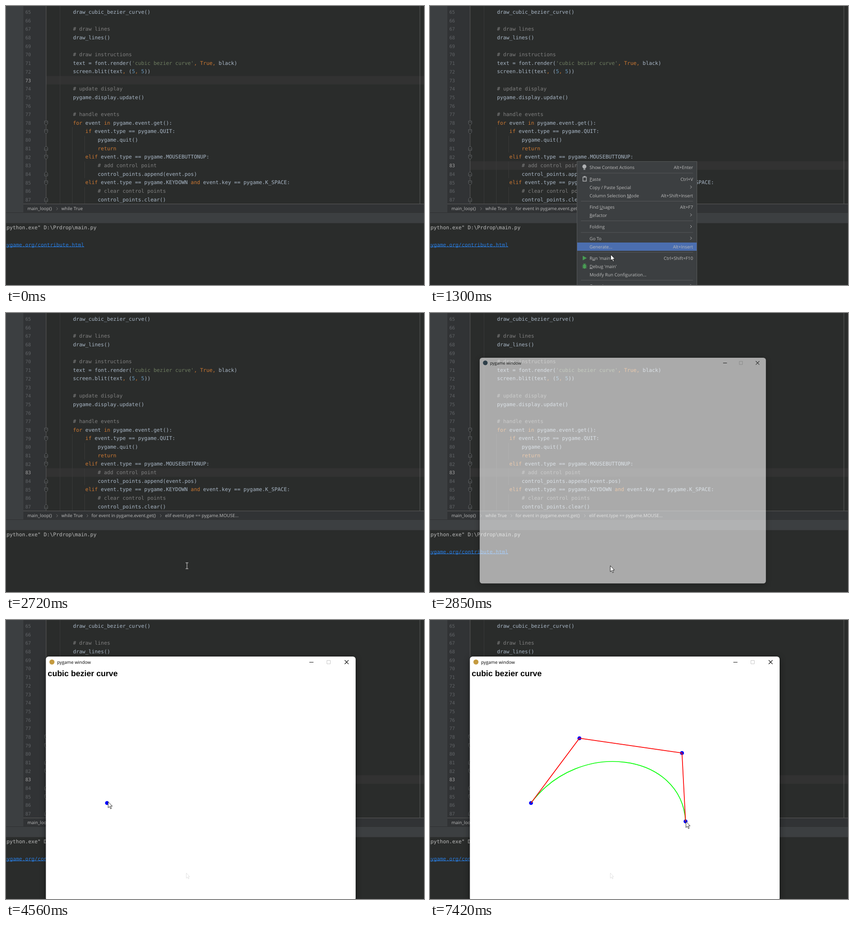
These frames come from a looping animation (917x611 px, 8 s). An HTML page:

```html
<!DOCTYPE html>
<html lang="en">
<head>
<meta charset="utf-8">
<title>Cubic bezier curve</title>
<style>
  html, body { margin: 0; width: 100%; height: 100%; overflow: hidden; background: #2a2c2b; }
  svg { display: block; width: 100vw; height: 100vh; }
  text { white-space: pre; text-rendering: geometricPrecision; }
  .mono { font: 11.3px "DejaVu Sans Mono", "Noto Sans Mono", monospace; fill: #a9b7c6; }
  .num { font-size: 10.3px; fill: #606366; }
  .ui { font: 9.8px "Open Sans", "Noto Sans", sans-serif; fill: #bbb; }
  .head { font: bold 17.6px "Liberation Sans", Arial, sans-serif; }
  .kw { fill: #cc7832; }
  .str { fill: #6e7d60; }
  .val { fill: #6897bb; }
  .note { fill: #808080; }
  .u { text-decoration: underline; }
</style>
</head>
<body>
<svg id="stage" viewBox="0 0 917 611" preserveAspectRatio="none"></svg>
<script>
const LOOP = 8000, ROW = 18.69, CHAR = 6.8;
const rowY = n => 13 + (n - 65) * ROW;

const code = `        draw_cubic_bezier_curve()

        # draw lines
        draw_lines()

        # draw instructions
        text = font.render('cubic bezier curve', True, black)
        screen.blit(text, (5, 5))

        # update display
        pygame.display.update()

        # handle events
        for event in pygame.event.get():
            if event.type == pygame.QUIT:
                pygame.quit()
                return
            elif event.type == pygame.MOUSEBUTTONUP:
                # add control point
                control_points.append(event.pos)
            elif event.type == pygame.KEYDOWN and event.key == pygame.K_SPACE:
                # clear control points
                control_points.clear()`.split('\n');

// label, shortcut ('>' opens a submenu), centre y; & marks the mnemonic
const items = [
  ['Show Context Actions', 'Alt+Enter', 353.5],
  ['&Paste', 'Ctrl+V', 379],
  ['Copy / Paste Special', '>', 397],
  ['Column Selection &Mode', 'Alt+Shift+Insert', 415],
  ['Find &Usages', 'Alt+F7', 440.5],
  ['&Refactor', '>', 458],
  ['Folding', '>', 483.5],
  ['Go To', '>', 509],
  ['Generate...', 'Alt+Insert', 527],
  ["R&un 'main'", 'Ctrl+Shift+F10', 552],
  ["&Debug 'main'", '', 570],
  ['Modify Run Configuration...', '', 588],
  ['Open In', '>', 613]
];
const separators = [366, 427.5, 470.5, 496, 539.5, 600.5];

const rect = (x, y, w, h, fill, more = '') =>
  `<rect x="${x}" y="${y}" width="${w}" height="${h}" fill="${fill}" ${more}/>`;
const path = (d, stroke, more = '') => `<path d="${d}" fill="none" stroke="${stroke}" ${more}/>`;
const text = (x, y, cls, body, more = '') => `<text x="${x}" y="${y}" class="${cls}" ${more}>${body}</text>`;
const group = (id, body, more = '') => `<g id="${id}" ${more}>${body}</g>`;
const chevron = (x, y, color) => path(`M${x - 1.5} ${y - 3}l3 3l-3 3`, color);

function paint(line) {
  const rule = /(#.*)|('.*?')|(\b(?:for|in|if|elif|return|and|True)\b|,)|(\b\d+\b)/g;
  return line.replace(rule, (all, note, str, kw) =>
    `<tspan class="${note ? 'note' : str ? 'str' : kw ? 'kw' : 'val'}">${all}</tspan>`);
}

function codeLine(line, i) {
  const y = rowY(65 + i), body = line.trimStart();
  const x = 92.5 + (line.length - body.length) * CHAR;
  return text(42.4, y + 4, 'mono num', 65 + i, `id="n${65 + i}"`) + text(x, y + 3.6, 'mono', paint(body));
}

function fold(n, dir) {
  const y = rowY(n);
  return `<path d="M84.5 ${y - 4 * dir}h7v${6 * dir}l-3.5 ${3 * dir}l-3.5 ${-3 * dir}z" fill="#2a2c2b" stroke="#606366"/>`
    + path(`M86.3 ${y - dir}h3.4`, '#606366');
}

function editor() {
  const guide = (x, a, b) => path(`M${x} ${a}V${b}`, '#393939');
  const inner = [80, 83, 86].map(n => guide(172.5, rowY(n) - 9, Math.min(433, rowY(n + 1) + 9))).join('');
  return rect(0, 0, 917, 611, '#2a2c2b')
    + rect(38, 0, 50, 433, '#313335')
    + rect(88, 0, 829, 18.6, '#323232', 'id="caret"')
    + guide(118.5, 0, 433) + guide(145.5, 265, 433) + inner
    + path('M88 0V433M908 0V433', '#5a5a5a')
    + code.map(codeLine).join('')
    + [78, 79, 82, 85].map(n => fold(n, 1)).join('')
    + [81, 84, 87].map(n => fold(n, -1)).join('')
    + rect(0, 0, 38, 453, '#3c3f41')
    + rect(38, 433, 879, 20, '#313335')
    + path('M38 433.5H917', '#5a5a5a')
    + path('M0 452.5H917', '#2f3031')
    + rect(0, 453, 917, 22.5, '#3c3f41');
}

function crumbs() {
  const crumb = (x, s) => text(x, 447.3, 'ui', s);
  return crumb(47, 'main_loop()') + chevron(112, 444, '#777') + crumb(121.5, 'while True')
    + group('crumbs', chevron(178.5, 444, '#777') + crumb(187.5, 'for event in pygame.event.get()')
      + chevron(339.5, 444, '#777') + crumb(349, 'elif event.type == pygame.MOUSE...'));
}

function output() {
  return text(-5.6, 489.3, 'mono', '\\python.exe" D:\\Prdrop\\main.py', 'id="command" style="fill:#bbb"')
    + group('link', text(-5.4, 526.6, 'mono', 'pygame.org/contribute.html', 'style="fill:#287bde"')
      + path('M0 527.5H171.5', '#287bde'));
}

function menu() {
  const label = s => s.replace(/&(.)/, '<tspan class="u">$1</tspan>');
  const rows = items.map(([s, key, y]) => text(350, y + 3.5, 'ui', label(s))
    + (key === '>' ? chevron(572.5, y - 0.5, '#bbb') : text(577, y + 3.5, 'ui', key, 'text-anchor="end"')));
  const bulb = '<circle cx="338.7" cy="351.5" r="4.4" fill="#afb1b3"/>' + rect(336.7, 355, 4, 4, '#8d9092');
  const board = path('M335.5 374.5h7.5v9h-7.5z', '#afb1b3', 'stroke-width="1.4"') + rect(337.2, 372.5, 4, 3, '#afb1b3');
  const play = '<path d="M335 547l9 5l-9 5z" fill="#499c54"/>';
  const bug = '<ellipse cx="339" cy="570.5" rx="3.3" ry="4.8" fill="#499c54"/>'
    + path('M334 567.5h10M333.5 570.5h11M334 573.5h10M336.5 564l5 3M341.5 564l-5 3', '#499c54', 'stroke-width="1.2"');
  return group('menu', rect(322.5, 340.5, 263, 290, '#3c3f41', 'stroke="#565859"')
    + rect(323, 0, 262, 18, '#4b6eaf', 'id="hover"')
    + path(separators.map(y => `M331 ${y}H577`).join(''), '#555759')
    + rows.join('') + bulb + board + play + bug);
}

const points = [[221.6, 400.7], [327.8, 259], [552.8, 291.2], [560.6, 441]];
const added = [4360, 5510, 6470, 7350];
const pressed = [[4290, 4360], [5440, 5510], [6400, 6540], [7280, 7420]];

function gameWindow() {
  const dots = points.map(([x, y], i) => `<circle id="dot${i}" cx="${x}" cy="${y}" r="4.3" fill="#00f"/>`).join('');
  const [a, b, c, d] = points;
  return group('win', rect(0, 0, 679.5, 535, '#fff', 'rx="6"')
      + '<circle id="icon" cx="13.3" cy="12" r="5.6"/>'
      + text(24.5, 15.8, 'ui', 'pygame window', 'style="fill:#000"')
      + path('M578 12.5h9M655.5 8l8.5 8.5M664 8l-8.5 8.5', '#111', 'stroke-width="1.1"')
      + path('M616.5 8.5h7.5v7.5h-7.5z', '#c6c6c6'), 'style="filter:drop-shadow(0 3px 7px #0007)"')
    + group('scene', text(91.6, 123, 'head', 'cubic bezier curve')
      + path('M395.5 554v11.5l2.6-2.5l2 4l1.5-.8l-1.8-4h3z', '#e2e2e2') + dots
      + path(`M${a}C${b} ${c} ${d}`, '#0f0', 'id="curve" stroke-width="1.7"')
      + path('', '#f00', 'id="lines" stroke-width="1.7"')
      + '<circle id="click" r="10.3" fill="#ff0" fill-opacity=".47"/>');
}

const cursors = group('arrow',
    '<path d="M.5 .5V13.6L3.6 10.7L5.7 15.8L7.8 14.9L5.7 10H9.7Z" fill="#fff" stroke="#111" stroke-width=".9"/>')
  + group('beam', path('M-3 -6.5H3M0 -6.5V6.5M-3 6.5H3', '#ddd'));

document.getElementById('stage').innerHTML =
  editor() + crumbs() + output() + menu() + gameWindow() + cursors;

const $ = id => document.getElementById(id);
const set = (id, name, value) => $(id).setAttribute(name, value);
const show = (id, on) => { $(id).style.display = on ? '' : 'none'; };
const smooth = p => p * p * (3 - 2 * p);

// bursts of screen updates: first, last, count
const bursts = [
  [0, 0, 1], [70, 820, 12], [890, 1650, 12], [1720, 1790, 2], [2050, 2320, 5], [2720, 2720, 1],
  [2850, 3140, 5], [3340, 3900, 9], [4290, 4360, 2], [4560, 5110, 9], [5440, 5510, 2],
  [5710, 5930, 4], [6130, 6200, 2], [6400, 6540, 3], [6740, 7020, 5], [7280, 7420, 3]
];

function snap(t) {
  const now = t + 8;
  const [a, b, n] = bursts.filter(s => s[0] <= now).pop();
  if (n === 1) return a;
  const step = (b - a) / (n - 1);
  return a + Math.min(n - 1, Math.floor((now - a) / step)) * step;
}

// pointer track: time, x, y
const track = [
  [70, 814, 568], [750, 322, 340], [890, 322, 340], [1304, 396, 544], [1650, 396, 556],
  [1790, 395, 553], [2850, 395, 553], [3140, 293, 427], [3300, 293, 427], [3760, 224, 396],
  [3900, 221.5, 400.5], [4510, 221.5, 400.5], [5110, 328, 259], [5640, 328, 259],
  [5930, 551, 291], [6060, 551, 291], [6200, 553, 291], [6670, 553, 291], [7020, 561, 441]
];

function pointer(t) {
  const i = track.findIndex(k => k[0] > t);
  if (i < 0) return track[track.length - 1].slice(1);
  if (i === 0) return track[0].slice(1);
  const a = track[i - 1], b = track[i], p = smooth((t - a[0]) / (b[0] - a[0]));
  return [1, 2].map(j => a[j] + (b[j] - a[j]) * p);
}

function render(time) {
  const t = snap(time % LOOP);
  const [x, y] = pointer(t);

  const line = t < 750 ? 73 : 83;
  set('caret', 'y', rowY(line) - 9.3);
  for (const n of [73, 83]) $('n' + n).style.fill = n === line ? '#a4a3a3' : '';
  show('crumbs', t >= 885);

  const menuOpen = t >= 885 && t < 2045;
  show('menu', menuOpen);
  const hoverY = pointer(t - 69)[1];
  const row = menuOpen && items.find(it => Math.abs(it[2] - hoverY) < 9);
  show('hover', row);
  if (row) set('hover', 'y', row[2] - 9);

  show('command', t < 2110 || t > 2250);
  show('link', t < 2110 || t >= 2845);

  const p = Math.max(0, Math.min(1, (t - 2850) / 220)), open = 1 - (1 - p) ** 2;
  show('win', t >= 2845);
  set('win', 'transform', `translate(${109 - 21.5 * open} ${98 - 18 * open}) scale(${0.924 + 0.076 * open})`);
  set('win', 'opacity', Math.min(1, 0.6 + open * 0.6));
  set('icon', 'fill', t < 2900 ? '#2f4a5c' : '#c49a3f');

  show('scene', t >= 3050);
  const count = added.filter(a => t >= a - 5).length;
  points.forEach((_, i) => show('dot' + i, i < count));
  set('lines', 'd', count > 1 ? 'M' + points.slice(0, count).join('L') : '');
  show('curve', count === 4);
  const hit = pressed.findIndex(([a, b]) => t >= a - 5 && t < b - 5);
  show('click', hit >= 0);
  if (hit >= 0) set('click', 'transform', `translate(${points[hit]})`);

  const beam = (t >= 65 && t < 885) || (t >= 2045 && t < 2845);
  show('beam', beam);
  show('arrow', !beam && t >= 65);
  set('beam', 'transform', `translate(${x + 2} ${y + 0.5})`);
  set('arrow', 'transform', `translate(${x} ${y})`);
}

const start = performance.now();
function tick() {
  render(performance.now() - start);
  requestAnimationFrame(tick);
}
tick();
</script>
</body>
</html>
```
